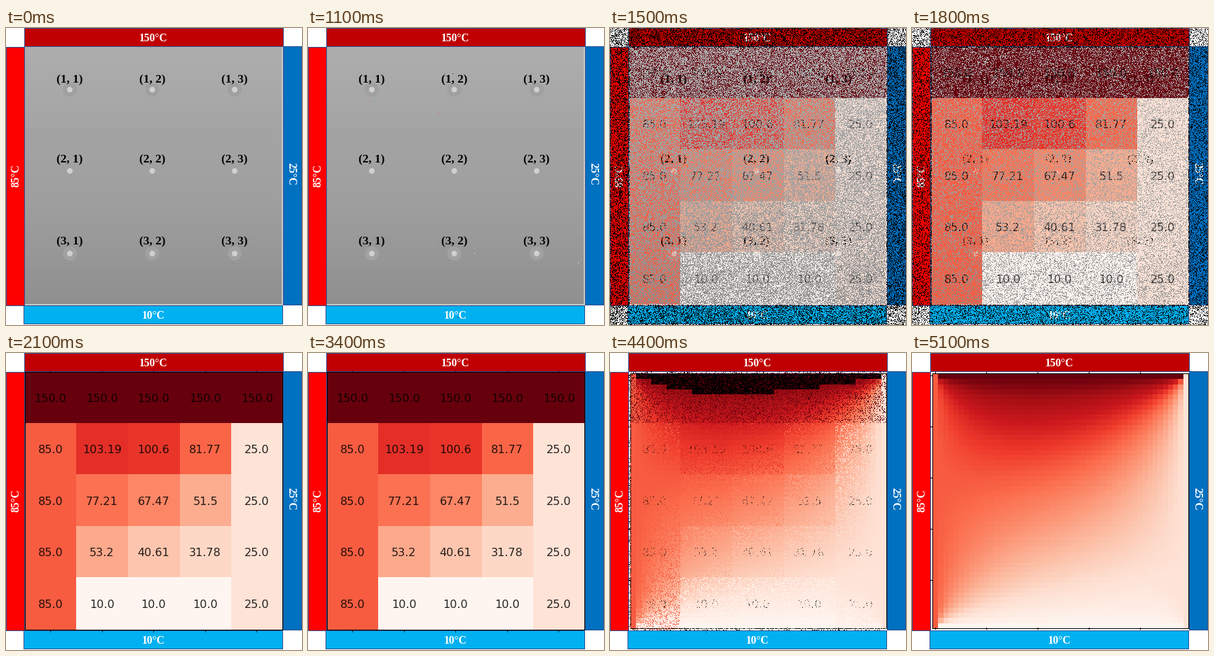
Recreate the animation shown at these times as a matplotlib script. Size 422x424 px, loop 5.6 s.

```python
import math

import matplotlib.pyplot as plt
import numpy as np
from matplotlib.animation import FuncAnimation
from matplotlib.patches import Circle, Rectangle

W, H, DPI = 422, 424, 100
STEP, LOOP, FADE = 100, 5600, 1000
PX = 72 / DPI
TOP, LEFT, RIGHT, BOTTOM = 150, 85, 25, 10
REDS = plt.get_cmap("Reds")

fig = plt.figure(figsize=(W / DPI, H / DPI), dpi=DPI, facecolor="white")
ax = fig.add_axes([0, 0, 1, 1])


def reset_axes():
    ax.clear()
    ax.set_xlim(0, W)
    ax.set_ylim(H, 0)
    ax.set_axis_off()


def rect(x0, y0, x1, y1, color):
    ax.add_patch(Rectangle((x0, y0), x1 - x0, y1 - y0, fc=color, ec="none", lw=0))


def outline(x0, y0, x1, y1, color):
    """One-pixel frame just inside the box."""
    rect(x0, y0, x1, y0 + 1, color)
    rect(x0, y1 - 1, x1, y1, color)
    rect(x0, y0, x0 + 1, y1, color)
    rect(x1 - 1, y0, x1, y1, color)


def label(x, y, text, size, color, rotation=0, rise=.33, **font):
    """Text whose digits are centred on (x, y), also when rotated."""
    angle = math.radians(rotation)
    ax.text(x + rise * size * math.sin(angle), y + rise * size * math.cos(angle),
            text, fontsize=size * PX, color=color, rotation=rotation,
            rotation_mode="anchor", ha="center", va="baseline", **font)


def picture(values, x0, y0, x1, y1, **kw):
    # Same zorder as patches, so everything stacks in drawing order.
    ax.imshow(values, extent=(x0, x1, y1, y0), aspect="auto",
              interpolation="nearest", zorder=1, **kw)
    ax.set_xlim(0, W)
    ax.set_ylim(H, 0)


def bars():
    sides = [((26, 0, 396, 27), "#c00000", TOP, (210.5, 14), 0),
             ((0, 27, 27, 397), "#ff0000", LEFT, (13, 211), 90),
             ((395, 26, 422, 396), "#0070c0", RIGHT, (407, 208.5), 270),
             ((25, 396, 395, 423), "#00b0f0", BOTTOM, (210, 410), 0)]
    for box, color, degrees, (x, y), rotation in sides:
        rect(*box, color)
        outline(*box, "#2f528f")
        label(x, y, f"{degrees}°C", 15.5, "white", rotation,
              family="Liberation Serif", weight="bold")


def plate():
    bars()
    shade = np.interp(np.arange(27, 395), [27, 130, 250, 320, 394],
                      [173, 165, 158, 151, 143]) / 255
    picture(shade[:, None], 27, 27, 394, 395, cmap="gray", vmin=0, vmax=1)
    rect(27, 394, 395, 396, "#c8c8c8")
    rect(393, 27, 395, 396, "#c8c8c8")
    for row, (y, text_y) in enumerate([(88, 73), (204, 187), (322, 304)], 1):
        for col, x in enumerate([91, 208.5, 326], 1):
            if row != 2:
                halo = "#a0a0a0" if row == 1 else "#a3a1a1"
                ax.add_patch(Circle((x, y), 10, fc=halo, ec="none"))
            ax.add_patch(Circle((x, y), 4, fc="#d0d0d0", ec="none"))
            label(x, text_y, f"({row}, {col})", 17.3, "black",
                  family="Liberation Serif", weight="bold")


def coarse_map():
    bars()
    inner = [[103.19, 100.6, 81.77], [77.21, 67.47, 51.5], [53.2, 40.61, 31.78]]
    rows = [[float(TOP)] * 5]
    rows += [[float(LEFT), *mid, float(RIGHT)] for mid in inner + [[float(BOTTOM)] * 3]]
    xs, ys = [27, 100, 174, 248, 321, 394], [27, 100, 173, 247, 320, 395]
    for r, row in enumerate(rows):
        for c, value in enumerate(row):
            rect(xs[c], ys[r], xs[c + 1], ys[r + 1],
                 REDS((value - BOTTOM) / (TOP - BOTTOM)))
            label(63.3 + 73.6 * c, 63.7 + 73.6 * r, str(value), 16,
                  (0, 0, 0, .85), rise=.365, family="DejaVu Sans")
    outline(27, 27, 395, 396, "black")
    for c in range(5):
        x = round(63 + 73.6 * c)
        rect(x, 25, x + 1, 28, "#300000")
        rect(x, 396, x + 1, 399, "#202020")


def heat(n=50):
    """Steady temperature of a square plate with fixed sides."""
    grid = np.full((n, n), 60.0)
    grid[0], grid[-1] = TOP, BOTTOM
    grid[:, 0], grid[:, -1] = LEFT, RIGHT
    for _ in range(4000):
        grid[1:-1, 1:-1] = (grid[:-2, 1:-1] + grid[2:, 1:-1]
                            + grid[1:-1, :-2] + grid[1:-1, 2:]) / 4
    return grid


def fine_map():
    bars()
    rect(27, 27, 395, 396, "white")
    picture(heat(), 30, 30, 394, 393, cmap=REDS, vmin=BOTTOM, vmax=TOP)
    outline(29, 29, 395, 394, "black")
    for k in range(5):
        pos = round(33 + 73 * k)
        rect(pos, 27, pos + 1, 30, "black")
        rect(pos, 392, pos + 1, 395, "black")
        rect(26, pos - 1, 30, pos, "black")


def snapshot(draw):
    reset_axes()
    draw()
    fig.canvas.draw()
    return np.asarray(fig.canvas.buffer_rgba())[..., :3].copy()


PLATE, COARSE, FINE = (snapshot(scene) for scene in (plate, coarse_map, fine_map))
NOISE = np.random.default_rng(7).random((H, W))
OUTSIDE = np.ones((H, W), bool)
OUTSIDE[27:396, 27:395] = False

reset_axes()
screen = ax.imshow(PLATE, extent=(0, W, H, 0), aspect="auto", interpolation="nearest")


def progress(t, start):
    # The first step lets only a few specks through.
    return min(max((t - start) / FADE + 6e-5, 0), 1)


def compose(t):
    if t < 3000:
        p = progress(t, 1100)
        frame = np.where((NOISE < p)[..., None], COARSE, PLATE)
        frame[OUTSIDE & (NOISE < min(p, 1 - p))] = 0
    else:
        p = progress(t, 3600)
        frame = np.where((NOISE < p)[..., None], FINE, COARSE)
        if p < 1:
            frame[~OUTSIDE & (NOISE < p) & (FINE[..., 0] < 150)] = 0
    return frame


def update(n):
    screen.set_data(compose(n * STEP))
    return [screen]


anim = FuncAnimation(fig, update, frames=LOOP // STEP, interval=STEP,
                     repeat=True, repeat_delay=0, blit=False)
plt.show()
```
